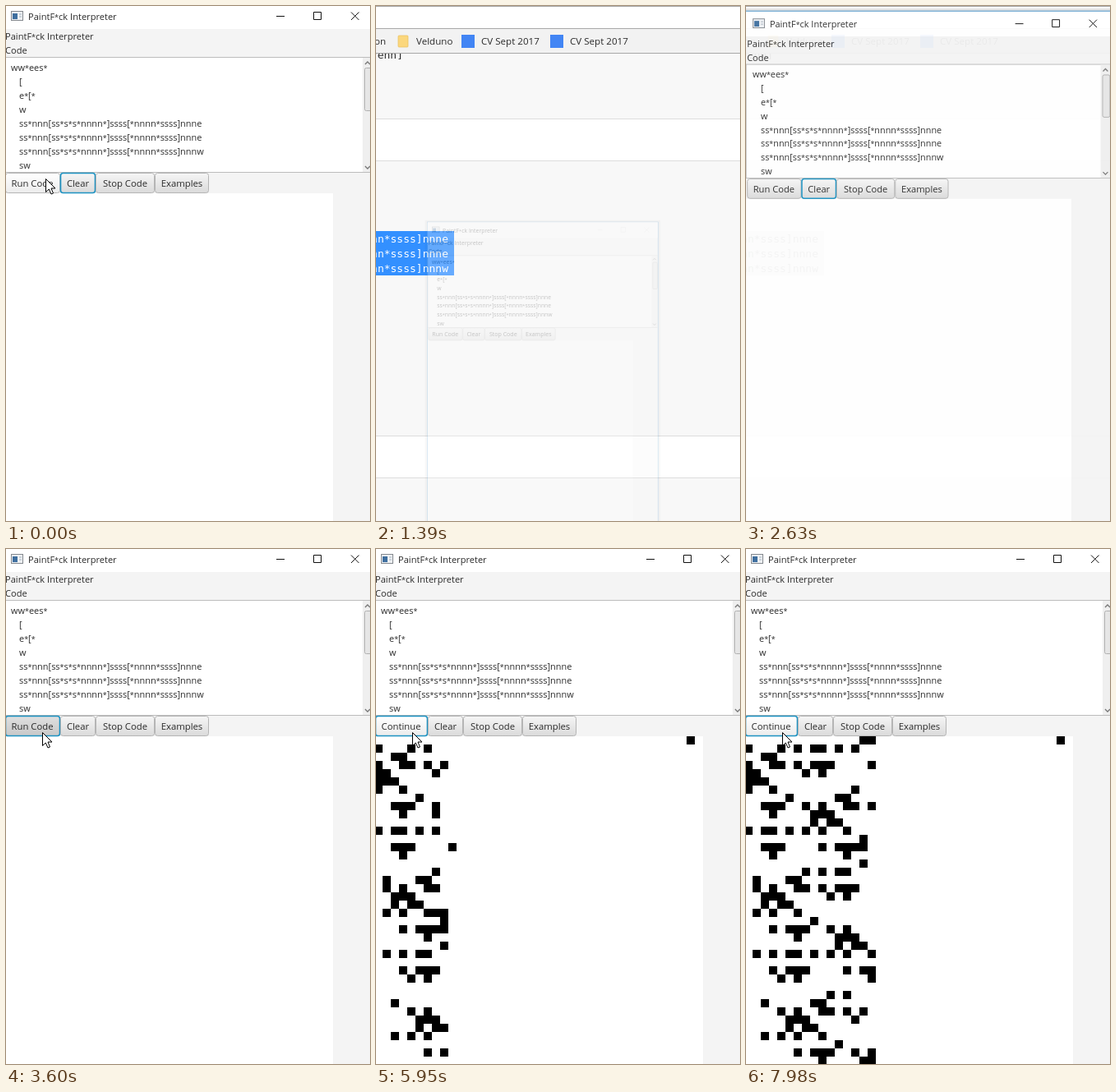
These frames come from a looping animation (443 px wide and 627 px high, 8 s). An HTML page:

```html
<!DOCTYPE html>
<html lang="en">
<head>
<meta charset="utf-8">
<title>PaintF*ck Interpreter</title>
<style>
html, body { margin: 0; width: 100%; height: 100%; overflow: hidden; background: #fff; }
svg { display: block; width: 443px; height: 627px; }
text { font-family: "Open Sans", "Noto Sans", sans-serif; font-size: 11.1px; fill: #2b2b2b; white-space: pre; }
.star { font-size: 9px; }
.tab text { font-size: 11.6px; }
.mono text { font-family: "DejaVu Sans Mono", monospace; font-size: 13px; }
.code text { font-size: 10.95px; }
#buttons text { font-size: 11.3px; }
#selection text { fill: #fff; }
#selection.idle text { fill: #333; }
#selection.idle tspan { fill: #164a1c; }
#selection rect { fill: #3390ff; }
#selection.idle rect { fill: #c8c8c8; }
</style>
</head>
<body>
<svg viewBox="0 0 443 627">
  <defs>
    <linearGradient id="normal" x2="0" y2="1"><stop stop-color="#f6f6f6"/><stop offset="1" stop-color="#dadada"/></linearGradient>
    <linearGradient id="hover" x2="0" y2="1"><stop stop-color="#fff"/><stop offset="1" stop-color="#ececec"/></linearGradient>
    <linearGradient id="pressed" x2="0" y2="1"><stop stop-color="#e0e0e0"/><stop offset="1" stop-color="#c8c8c8"/></linearGradient>
  </defs>

  <g id="page">
    <rect width="443" height="627" fill="#f8f8f8"/>
    <g class="mono"><text x="33" y="64" text-anchor="end">renn]</text></g>
    <path d="M0 138H443V188H0ZM0 524H443V574H0ZM0 0H443V27H0Z" fill="#fff"/>
    <path d="M0 137.5H443M0 188.5H443M0 523.5H443M0 574.5H443" stroke="#ddd"/>
    <rect y="27" width="443" height="31" fill="#f2f2f2"/>
    <path d="M0 .5H443M0 27.5H443M0 57.5H443" stroke="#a8a8a8"/>
    <g class="tab">
      <text x="12" y="47" text-anchor="end">on</text>
      <rect x="27" y="36" width="12" height="14" rx="1" fill="#fbd77d" stroke="#e8bf5c" stroke-width=".7"/>
      <text x="49" y="47">Velduno</text>
      <rect x="104" y="35" width="16" height="16" fill="#4285f4"/>
      <text x="128" y="47">CV Sept 2017</text>
      <rect x="212" y="35" width="16" height="16" fill="#4285f4"/>
      <text x="236" y="47">CV Sept 2017</text>
    </g>
    <g id="selection" class="mono"><rect y="274" width="95" height="54"/></g>
  </g>

  <g id="window">
    <rect x="-5" y="-4" width="454" height="660" fill="none" stroke="#000" stroke-opacity=".12" stroke-width="5"/>
    <rect x="-3" y="-3" width="450" height="658" fill="#f4f4f4" stroke="#3f8cc4" stroke-width="1.2"/>
    <rect x="-2.5" y="-2.5" width="449" height="30.5" fill="#fff"/>
    <rect x="6.5" y="6.5" width="14" height="11" fill="#eef1f4" stroke="#84898f"/>
    <rect x="8" y="9" width="6" height="7" fill="#3f6f9f"/>
    <path d="M16 10h3M16 13h3" stroke="#a8b4c0"/>
    <path id="controls" d="M329 12.5H339M374.5 7.5H383.5V16.5H374.5ZM420 7.5L429.5 17M429.5 7.5L420 17" fill="none" stroke="#111"/>
    <g id="titles"></g>
    <rect x="-2" y="62.5" width="448" height="140" fill="#fff" stroke="#bcbcbc"/>
    <g id="code" class="code"></g>
    <rect x="434" y="63" width="12" height="139" fill="#efefef"/>
    <rect x="436.5" y="75.5" width="9" height="52" rx="2" fill="#e6e6e6" stroke="#b0b0b0"/>
    <path d="M437 71L440 68L443 71M437 195L440 198L443 195" fill="none" stroke="#777" stroke-width="1.3"/>
    <rect x="-2" y="228" width="400" height="400" fill="#fff"/>
    <g id="buttons"></g>
    <path id="cells" shape-rendering="crispEdges"/>
  </g>
  <path id="cursor" d="M.5 .5V16.5L4.3 13L7 19L9.5 18L7 12H12Z" fill="#fff" stroke="#000"/>
</svg>

<script>
const LOOP = 8000;
const HIDE = 1130, GONE = 1840, RESTORE = 2380, RESTORED = 3070;
const $ = id => document.getElementById(id);
const clamp = x => Math.max(0, Math.min(1, x));

const label = (x, y, text) =>
  `<text x="${x}" y="${y}">${text.replaceAll("*", '<tspan class="star">*</tspan>')}</text>`;
const title = "PaintF*ck Interpreter";
$("titles").innerHTML = label(27, 17, title) + label(-1, 41, title) + label(-1, 58, "Code");

const rule = "ss*nnn[ss*s*s*nnnn*]ssss[*nnnn*ssss]nnn";
const lines = ["ww*ees*", " [", " e*[*", " w", ` ${rule}e`, ` ${rule}e`, ` ${rule}w`, " sw"];
$("code").innerHTML = lines.map((line, i) =>
  label(line[0] === " " ? 16 : 6, 79 + 17 * i, line.trim())).join("");
$("selection").innerHTML += ["e", "e", "w"].map((end, i) =>
  `<text x="88" y="${288 + 18 * i}" text-anchor="end"><tspan>nn</tspan>*ssss]nnn${end}</text>`).join("");

// The trail repeats every 3 columns, 15 rows further down (modulo 40).
// Each entry: column, sweep in which the head sets it, rows, and sweeps until it is cleared.
const STEP = 36 / 7, ORIGIN = 4835, PERIOD = 175, START = 3850;
const trail = [
  [4, -1, [3, 8, 13, 19, 20, 29, 33, 36]],
  [4, 1, [1]],
  [5, 0, [7, 20, 23, 28]],
  [5, 1, [34, 35]],
  [5, 2, [11, 17, 26]],
  [6, 0, [38]],
  [6, 1, [3, 21, 23, 24, 33, 34]],
  [6, 2, [36]],
  [6, 3, [1, 17, 18, 26, 28, 29]],
  [4, 0, [6, 34], 1],
  [5, 0, [6], 1],
  [5, 0, [8, 10], 2],
  [6, 1, [35], 1]
];

const cells = [[0, 38], [1, 0], [5, 0], [17, 1]].map(([row, col]) =>
  ({ row, col, on: START + row * 5, off: Infinity }));
for (const [baseCol, sweep, rows, life = Infinity] of trail)
  for (const baseRow of rows)
    for (let k = -2; k < 5; k++) {
      const col = baseCol + 3 * k, row = (baseRow + 15 * k + 40) % 40;
      // The first two columns are only partly filled by the seed.
      const seeded = col > 1 || life === Infinity && row < 12 + 15 * col && row !== 8 + 6 * col;
      if (col < 0 || !seeded) continue;
      const head = baseRow + 40 * sweep + PERIOD * k;
      cells.push({ row, col,
        on: Math.max(ORIGIN + head * STEP, START + row * 5),
        off: ORIGIN + (head + 40 * life) * STEP });
    }

function drawCells(t) {
  $("cells").setAttribute("d", cells.filter(c => t >= c.on && t < c.off)
    .map(c => `M${10 * c.col - 2} ${228 + 10 * c.row}h10v10h-10z`).join(""));
}

let buttonState = "";
function drawButtons(t, active) {
  const running = t >= 3690, pressed = t >= 3600 && !running;
  const focus = !active ? -1 : t >= 3600 ? 0 : 1;
  const look = pressed ? "pressed" : running || t < 200 ? "hover" : "normal";
  const state = [running, focus, look].join();
  if (state === buttonState) return;
  buttonState = state;
  const edges = [0, 66, 109, 181, 247].map((x, i) => running && i ? x - 3 : x);
  const names = [running ? "Continue" : "Run Code", "Clear", "Stop Code", "Examples"];
  $("buttons").innerHTML = names.map((name, i) => {
    const x = edges[i] - (i ? 0 : 1), width = edges[i + 1] - x, on = i === focus;
    return `<rect x="${x + .5}" y="203.5" width="${width - 1}" height="24" rx="3"
      fill="url(#${i ? "normal" : look})" stroke="${on ? "#1c92c2" : "#b5b5b5"}" stroke-width="${on ? 1.6 : 1}"/>
      <text x="${(edges[i] + edges[i + 1]) / 2 - (i ? 0 : 1)}" y="220" text-anchor="middle">${name}</text>`;
  }).join("");
}

function drawWindow(t, active) {
  let opacity = 1, shrink = 0, cx = 0, cy = 0;
  if (!active) {
    opacity = t < GONE ? Math.exp((1100 - t) / 209) : 0;
    [shrink, cx, cy] = [.5, 171, 705];
  } else if (t >= RESTORE && t < RESTORED) {
    opacity = 1 - .4 * Math.exp((RESTORE - t) / 120);
    [shrink, cx, cy] = [.217, 203, 862];
  }
  const scale = 1 - shrink * (1 - opacity);
  $("window").setAttribute("opacity", opacity);
  $("window").setAttribute("transform", `translate(${cx} ${cy}) scale(${scale}) translate(${-cx} ${-cy})`);
  $("controls").setAttribute("opacity", active ? 1 : .15);
  $("selection").classList.toggle("idle", t >= 2220);
}

function drawCursor(t) {
  const leave = clamp((t - 110) / 560), settle = clamp((t - 3220) / 150);
  const [x, y] = t < 3000 ? [48 + 50 * leave, 210 + 420 * leave] : [44, 226 - 3 * settle];
  $("cursor").setAttribute("transform", `translate(${x} ${y})`);
  $("cursor").setAttribute("visibility", t < 670 || t >= 3220 ? "visible" : "hidden");
}

const begin = performance.now();
function frame() {
  const t = (performance.now() - begin) % LOOP;
  const active = t < HIDE || t >= RESTORE;
  drawWindow(t, active);
  drawButtons(t, active);
  drawCells(t);
  drawCursor(t);
  requestAnimationFrame(frame);
}
frame();
</script>
</body>
</html>
```
